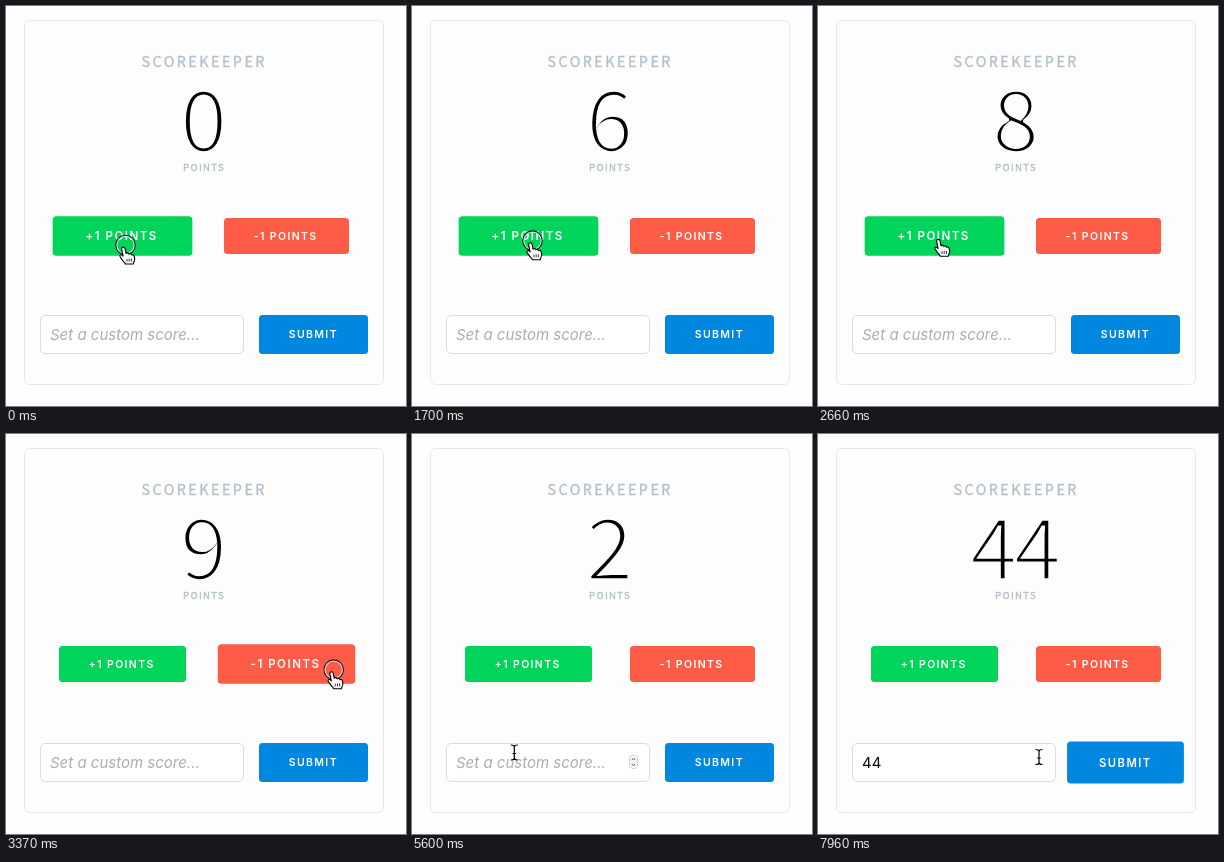
Animation of 400 by 400 pixels, one loop 7.99 s. Source, as an HTML page:

```html
<!DOCTYPE html>
<html lang="en">
<head>
<meta charset="utf-8">
<title>Scorekeeper</title>
<style>
  html, body { margin: 0; width: 100%; height: 100%; overflow: hidden; background: #fefefe; }
  svg { display: block; width: 100vw; height: 100vh; }
  text { white-space: pre; }
  .cap, #score { font-family: "Noto Sans CJK JP", "Noto Sans CJK SC", "Noto Sans", sans-serif; }
  .cap { fill: #b3bfc9; stroke: #b3bfc9; stroke-width: .35px; }
  /* a stroke in the card colour shaves the digits to a light weight */
  #score { font-size: 86px; letter-spacing: -4px; text-anchor: middle; stroke: #fdfdfd; stroke-width: 3.7px; }
  .btn text { font: 600 10.5px Inter, sans-serif; letter-spacing: 1.35px; fill: #fff; }
  .field { font: 15px Inter, sans-serif; }
  #hint { font-style: italic; fill: #adadad; }
</style>
</head>
<body>
<svg viewBox="0 0 400 400">
  <rect x="18.5" y="14.5" width="359" height="364" rx="5" fill="#fdfdfd" stroke="#e8e8e8"/>
  <text id="score" x="195.5" y="146.3">0</text>
  <text class="cap" x="135.5" y="61" font-size="14.3" letter-spacing="2.5">SCOREKEEPER</text>
  <text class="cap" x="177" y="165" font-size="9.6" letter-spacing="1.35">POINTS</text>

  <g class="btn" id="plus">
    <rect x="-63.5" y="-18" width="127" height="36" rx="3.5" fill="#00d45a"/>
    <text x="-33.7" y="4">+1 POINTS</text>
  </g>
  <g class="btn" id="minus">
    <rect x="-62.5" y="-18" width="125" height="36" rx="3.5" fill="#ff5c47"/>
    <text x="-32.7" y="4">-1 POINTS</text>
  </g>

  <rect id="glow" x="33" y="308.5" width="206" height="41" rx="6" fill="none" stroke="#d3eafc" stroke-width="2"/>
  <rect id="box" x="34.5" y="309.5" width="203" height="38" rx="4.5" fill="#fff" stroke="#dcdcdc"/>
  <text class="field" id="hint" x="44" y="334">Set a custom score...</text>
  <text class="field" id="typed" x="44" y="334"></text>
  <rect id="caret" y="319" width="1" height="18"/>
  <g id="spin" fill="none">
    <rect x="217.5" y="321.5" width="8" height="13" rx="3.5" fill="#fafafa" stroke="#d0d0d0"/>
    <path d="M219.7 326.2l1.8-2 1.8 2M219.7 329.8l1.8 2 1.8-2" stroke="#555"/>
  </g>

  <g class="btn" id="submit">
    <rect x="-54.5" y="-19.5" width="109" height="39" rx="3.5" fill="#0088e0"/>
    <text x="-24.7" y="3.8">SUBMIT</text>
  </g>

  <g id="cursor">
    <g id="ring" fill="none">
      <circle r="9.2" stroke="#fff" stroke-width="2.2" opacity=".75"/>
      <circle r="9.8" stroke="#111" stroke-width="1.1"/>
    </g>
    <g id="hand" transform="translate(.5 .7)" stroke="#000" stroke-width="1.1" stroke-linejoin="round" fill="#fff">
      <path d="M-4.4 3.4C-4.6.9-1.2.7-.9 3L0 7.8C.8 6.8 2.6 7 2.9 8.4 3.7 7.6 5.4 7.9 5.7 9.3 6.6 8.7 8 9.2 8.2 10.6L8.7 13Q8.8 15 7.6 16.6L7.4 18.3H-.8L-1.2 17Q-3.2 15.4-4.6 13C-5.8 11.4-6.8 10.4-6 9.4-5.2 8.6-4 9.2-2.9 10.4Z"/>
      <path d="M1 13.2V16M3.2 13V16M5.4 13V16" stroke-width=".8"/>
    </g>
    <g id="beam" fill="none" stroke="#000" stroke-width="1.2">
      <path id="bar" d="M-3.5-7Q0-7 0-5Q0-7 3.5-7M0-5V6M-3.5 8Q0 8 0 6Q0 8 3.5 8M-1.8 1.5H1.8" stroke="#fff" stroke-width="3"/>
      <path d="M-3.5-7Q0-7 0-5Q0-7 3.5-7M0-5V6M-3.5 8Q0 8 0 6Q0 8 3.5 8M-1.8 1.5H1.8"/>
    </g>
    <path id="arrow" d="M-1 0V14L2.2 11.2 4.4 16 6.6 15 4.5 10.4H8.8Z" stroke="#fff"/>
  </g>
</svg>
<script>
const LOOP = 7990, FADE = 100, LAG = 15, BLINK = 500;
const $ = id => document.getElementById(id);
const show = (id, on) => $(id).setAttribute('visibility', on ? 'visible' : 'hidden');
const clamp = v => Math.max(0, Math.min(1, v));
const ease = p => p * p * (3 - 2 * p);

const field = { x: 136, y: 328.5, w: 204, h: 39 };
const buttons = [
  { id: 'plus', x: 116.5, y: 230, w: 127, h: 36 },
  { id: 'minus', x: 280.5, y: 230, w: 125, h: 36 },
  { id: 'submit', x: 307.5, y: 328.5, w: 109, h: 39 }
];
const inside = (b, [x, y]) => Math.abs(x - b.x) < b.w / 2 && Math.abs(y - b.y) < b.h / 2;

// Where the pointer rests and when it gets there; longer trips take longer
const stops = [
  { x: 119.5, y: 239, at: 0 },
  { x: 120.5, y: 234.7, at: 290 },
  { x: 327.5, y: 235.5, at: 2330 },
  { x: 122.5, y: 231.3, at: 2640 },
  { x: 327.7, y: 235.7, at: 3330 },
  { x: 102.3, y: 318, at: 5600 },
  { x: 313.5, y: 322.5, at: 7300 },
  { x: 221, y: 322.5, at: 7960 }
];

function pointer(t) {
  let { x, y } = stops[0];
  for (const s of stops.slice(1)) {
    const dx = s.x - x, dy = s.y - y;
    const time = Math.max(110, 1.25 * Math.hypot(dx, dy));
    const p = ease(clamp(1 + (t - s.at) / time));
    if (!p) break;
    x += dx * p;
    y += dy * p;
  }
  return [x, y];
}

// Evenly spaced presses; points are gained on release
const burst = (from, gain, hold, count = 1, every = 0) =>
  Array.from({ length: count }, (_, i) => ({ down: from + i * every, up: from + i * every + hold, gain }));

const focus = burst(5780, 0, 120)[0], send = burst(7520, 0, 120)[0];
const clicks = [
  ...burst(0, 0, 30),
  ...burst(460, 1, 90, 3, 170),
  ...burst(1150, 1, 90, 4, 183),
  ...burst(1940, 1, 90),
  ...burst(2750, 1, 90),
  ...burst(3370, -1, 110, 5, 200),
  ...burst(4540, -1, 115, 2, 360),
  focus, send
];
const entry = '44', keys = [6760, 6940];

// Share of the last FADE ms the pointer spent on the button
function hover(b, t) {
  const n = 20;
  let hits = 0;
  for (let i = 0; i < n; i++) hits += inside(b, pointer(t - LAG - i / n * FADE));
  return ease(hits / n);
}

function draw(t) {
  const at = pointer(t);
  for (const b of buttons) {
    $(b.id).setAttribute('transform', `translate(${b.x} ${b.y}) scale(${1 + 0.1 * hover(b, t)})`);
  }

  const points = clicks.reduce((sum, c) => sum + (t >= c.up ? c.gain : 0), 0);
  $('score').textContent = t >= send.up ? entry : points;

  const focused = t >= focus.down && t < send.down;
  const pressed = keys.filter(k => t >= k);
  const typed = entry.slice(0, pressed.length);
  const lastEdit = Math.max(focus.down, ...pressed);
  $('typed').textContent = typed;
  show('hint', !typed);
  show('glow', focused);
  $('box').setAttribute('stroke', focused ? '#55b0f0' : '#dcdcdc');
  show('spin', focused || inside(field, pointer(t - FADE / 2)));
  show('caret', focused && Math.floor((t - lastEdit) / BLINK) % 2 === 0);
  $('caret').setAttribute('x', 44 + 9.5 * typed.length);

  const kind = inside(field, at) ? 'beam' : buttons.some(b => inside(b, at)) ? 'hand' : 'arrow';
  $('cursor').setAttribute('transform', `translate(${at})`);
  for (const k of ['hand', 'beam', 'arrow']) show(k, k === kind);
  show('ring', clicks.some(c => t >= c.down && t < c.up));
}

const begin = performance.now();
function tick() {
  draw((performance.now() - begin) % LOOP);
  requestAnimationFrame(tick);
}
draw(0);
tick();
</script>
</body>
</html>
```
